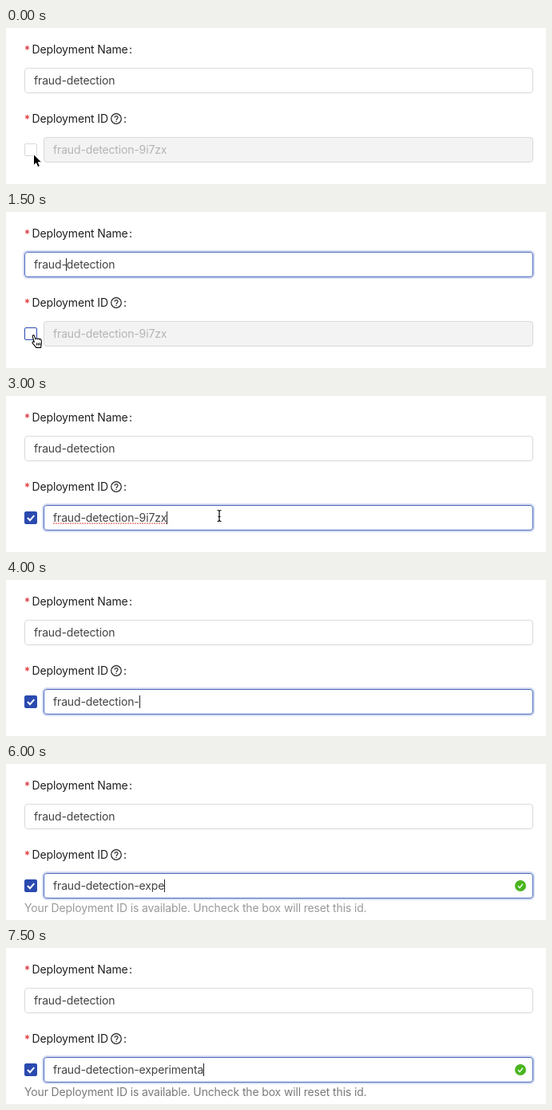
Animation, 676 px wide and 196 px high, one loop 8 s. Source, as an HTML page:

```html
<!DOCTYPE html>
<html lang="en">
<head>
<meta charset="utf-8">
<title>Deployment form</title>
<style>
  html, body { margin: 0; width: 100%; height: 100%; overflow: hidden; background: #fff; }
  svg { display: block; width: 676px; height: 196px; }
  text { font: 14px Inter, "Liberation Sans", sans-serif; letter-spacing: -.15px; fill: #434343; white-space: pre; }
  .label { fill: #1f1f1f; }
  .star { fill: #d8262c; }
  .box { fill: #fff; stroke: #d9d9d9; }
  .hover { stroke: #4a69bd; }
  .focus { stroke: #4a69bd; }
  .glow { fill: none; stroke: #d4dcf2; stroke-width: 2; }
  .off { fill: #f3f3f3; }
  .caret { stroke: #222; }
  #help { fill: #000; }
</style>
</head>
<body>
<svg viewBox="0 0 676 196">
  <text class="star" x="23" y="33">*</text>
  <text class="label" x="32.5" y="32">Deployment Name</text>
  <text class="label" x="154" y="32">:</text>
  <rect id="nameGlow" class="glow" x="22" y="49" width="639" height="34" rx="5"/>
  <rect id="nameBox" class="box" x="23.5" y="50.5" width="636" height="31" rx="3.5"/>
  <text id="name" x="35" y="71">fraud-detection</text>
  <path id="nameCaret" class="caret" d="M75.5 58v16"/>

  <text class="star" x="23" y="120">*</text>
  <text class="label" x="32.5" y="119">Deployment ID</text>
  <g fill="none" stroke="#222" stroke-width="1.2">
    <circle cx="138" cy="114" r="6.3"/>
    <path d="M136 112.6a2 1.9 0 1 1 3.1 1.5q-1.1.6-1.1 1.7M138 116.7v1.2"/>
  </g>
  <text class="label" x="147" y="119">:</text>

  <rect id="ripple" x="20.5" y="142.5" width="21" height="21" rx="3" fill="none" stroke="#e9edf8"/>
  <rect id="check" x="23.5" y="145.5" width="15" height="15" rx="1.5"/>
  <path id="tick" d="M27 153l3 3.2 5.3-6" fill="none" stroke="#fff" stroke-width="2"/>

  <rect id="idGlow" class="glow" x="46" y="136" width="615" height="34" rx="5"/>
  <rect id="idBox" x="47.5" y="137.5" width="612" height="31" rx="3.5"/>
  <text id="idText" x="59" y="158"></text>
  <path id="spell" fill="none" stroke="#e0443e" stroke-width="1.7" stroke-linecap="round" stroke-dasharray="0 3"/>
  <path id="idCaret" class="caret" d="M.5 145v16"/>

  <path id="spin" d="M644 147a6 6 0 1 1-6 6" fill="none" stroke="#2a4ab0" stroke-width="1.4" stroke-linecap="round"/>
  <g id="ok">
    <circle r="7" fill="#49b51f"/>
    <path d="M-3 .2l2.1 2.4 3.8-4.8" fill="none" stroke="#fff" stroke-width="1.4"/>
  </g>
  <text id="help" x="23" y="186">Your Deployment ID is available. Uncheck the box will reset this id.</text>

  <path id="arrow" d="M34.5 158.5v14.2l3.2-3 2.2 5 2.5-1.1-2.1-4.8h4.4z" fill="#000" stroke="#fff"/>
  <path id="hand" d="M35.3 163.5l-2-6.6c-.7-2.4 1.6-3 2.3-1l1.4 4c.1-1.6 2.2-1.5 2.5-.1.5-1.2 2.1-.9 2.4.4.7-1 2-.5 2.2.7.5 2.4.8 4 .1 6.1l-.6 3.4h-6c-.8-2-2.7-3.5-4.1-5.3-1.4-1.7.5-3 1.8-1.6zM38.6 164.5v3M40.6 164.5v3M42.5 164.5v3" fill="#fff" stroke="#000" stroke-width="1.1" stroke-linejoin="round"/>
  <path id="beam" d="M264.5 143.5q2.5 0 2.5 1.5 0-1.5 2.5-1.5M267 145v11M264.5 157.5q2.5 0 2.5-1.5 0 1.5 2.5 1.5M265.5 151.5h3" fill="none" stroke="#000" stroke-width="1.2"/>
</svg>
<script>
const $ = id => document.getElementById(id);
const STEP = 500;
const BASE = "fraud-detection-";
const OLD = { tail: "9i7zx" };
const typed = (tail, help, size) => ({ on: 1, focus: "id", caret: 1, tail, help, size });

// One entry per half second
const steps = [
  { ...OLD, cursor: "arrow" },
  { ...OLD, cursor: "arrow", focus: "name", caret: 1 },
  { ...OLD, cursor: "hand", focus: "name", hover: 1 },
  { ...OLD, cursor: "hand", focus: "name", caret: 1, hover: 1 },
  { ...OLD, cursor: "hand", on: 1, ripple: 1 },
  { ...OLD, cursor: "beam", on: 1, hover: 1 },
  { ...OLD, cursor: "beam", on: 1, focus: "id", caret: 1, spell: 1 },
  { ...OLD, cursor: "beam", on: 1, focus: "id", spell: 1 },
  typed("", 0, 0),
  { ...typed("e", 0, 0), spin: 1 },
  typed("ex", .38, 1.12),
  typed("exp", .4, 1),
  typed("expe", .4, 1),
  typed("experi", .45, 1),
  typed("experimen", .45, 1),
  typed("experimenta", .52, 1)
];

const show = (id, on) => { $(id).style.display = on ? "" : "none"; };

function draw(s) {
  const onName = s.focus === "name", onId = s.focus === "id";
  show("nameGlow", onName);
  show("nameCaret", onName && s.caret);
  $("nameBox").setAttribute("class", onName ? "box focus" : "box");

  show("idGlow", onId);
  const idState = onId ? " focus" : !s.on ? " off" : s.hover ? " hover" : "";
  $("idBox").setAttribute("class", "box" + idState);
  const text = $("idText");
  text.textContent = BASE + s.tail;
  text.style.fill = s.on ? "" : "#b4b4b4";
  const end = 59 + text.getComputedTextLength();
  show("idCaret", onId && s.caret);
  $("idCaret").setAttribute("transform", `translate(${Math.round(end)})`);
  show("spell", s.spell);
  $("spell").setAttribute("d", `M60 160H${end}`);

  $("check").setAttribute("fill", s.on ? "#2a4ab0" : "#fff");
  $("check").setAttribute("stroke", s.on || s.hover ? "#2a4ab0" : "#d9d9d9");
  show("tick", s.on);
  show("ripple", s.ripple);

  show("spin", s.spin);
  show("ok", s.size);
  $("ok").setAttribute("transform", `translate(644 153) scale(${s.size || 1})`);
  $("help").style.opacity = s.help || 0;
  for (const c of ["arrow", "hand", "beam"]) show(c, s.cursor === c);
}

let last = -1;
const start = performance.now();
function tick() {
  const i = Math.floor((performance.now() - start) / STEP) % steps.length;
  if (i !== last) draw(steps[last = i]);
  requestAnimationFrame(tick);
}
tick();
</script>
</body>
</html>
```
